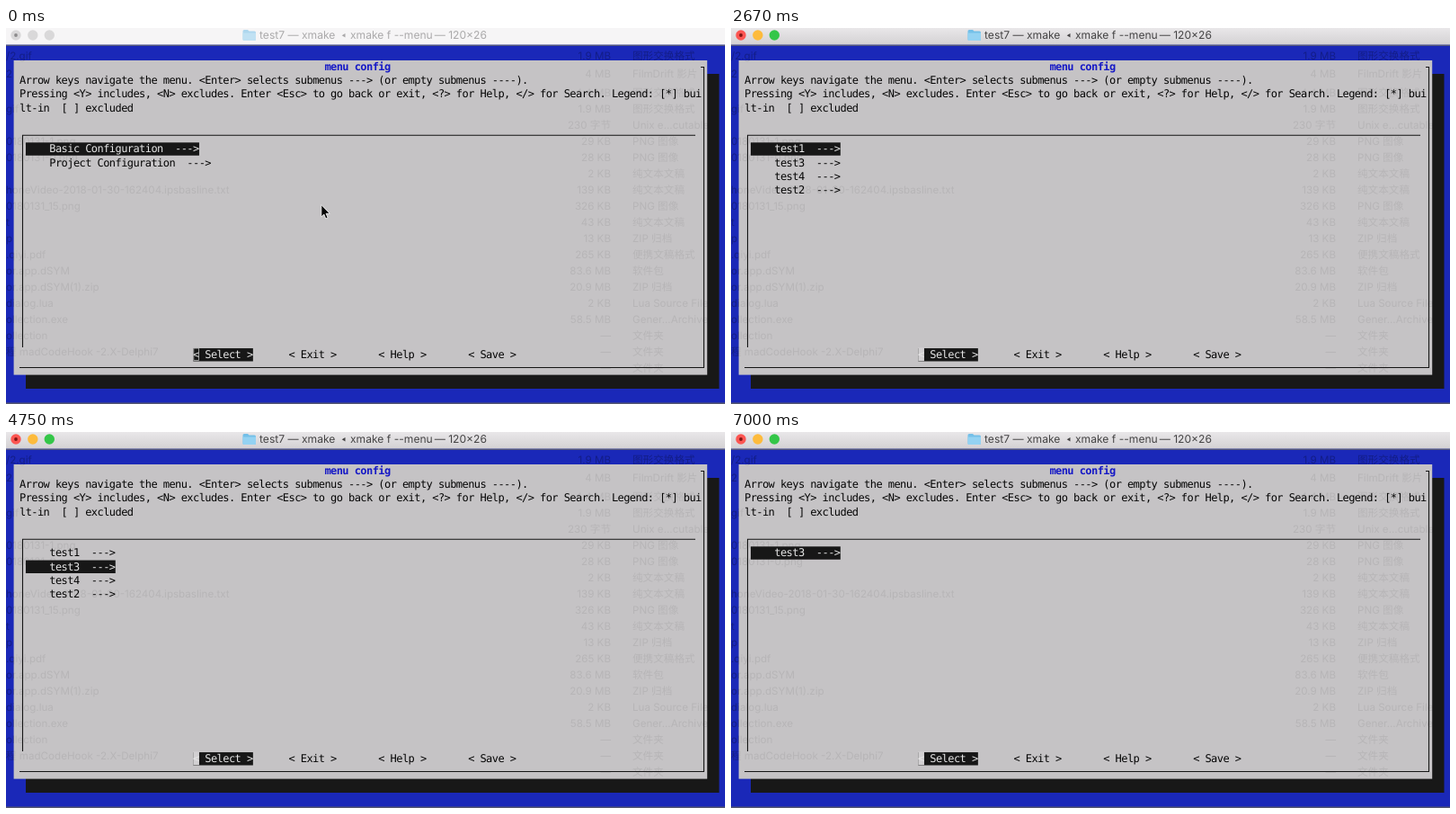
Write an HTML page that moves like this. It is 800x418 px and loops after 7080 ms.

```html
<!DOCTYPE html>
<html lang="en">
<head>
<meta charset="utf-8">
<title>menu config</title>
<style>
  html, body { margin: 0; width: 100%; height: 100%; overflow: hidden; background: #1a28b8; }
  svg { display: block; width: 100%; height: 100%; }
  text { white-space: pre; text-rendering: geometricPrecision; }
  .mono { font: 12px "DejaVu Sans Mono", monospace; letter-spacing: -.569px; fill: #050505; }
  .mono.title { font-weight: bold; fill: #1518c6; }
  .mono.lit { fill: #e6e6e6; }
  .bar { fill: #171717; }
  .ui { font: 12.1px Inter, "Noto Sans CJK SC", "Noto Sans CJK", sans-serif; }
  .ghost { font-size: 11.6px; fill: #000; }
  .rule { fill: none; stroke: #151515; stroke-width: 1.1; }

  .timed { opacity: 0; animation: 7080ms step-end infinite; }
  #idle { animation-name: idle; }
  #focus { animation-name: focus; }
  #arrow { animation-name: arrow; }
  #beam { animation-name: beam; }
  #basic { animation-name: basic; }
  #project { animation-name: project; }
  #first { animation-name: first; }
  #second { animation-name: second; }
  #target { animation-name: inner; }
  @keyframes idle { 0% { opacity: 1 } 17.66%, 100% { opacity: 0 } }
  @keyframes focus { 0% { opacity: 0 } 17.66%, 100% { opacity: 1 } }
  @keyframes arrow { 0% { opacity: 1 } 14.12%, 100% { opacity: 0 } }
  @keyframes beam { 0% { opacity: 0 } 14.12% { opacity: 1 } 22.32%, 100% { opacity: 0 } }
  @keyframes basic { 0% { opacity: 1 } 22.32%, 100% { opacity: 0 } }
  @keyframes project { 0% { opacity: 0 } 22.32% { opacity: 1 } 35.31%, 100% { opacity: 0 } }
  @keyframes first { 0% { opacity: 0 } 35.31% { opacity: 1 } 43.5%, 100% { opacity: 0 } }
  @keyframes second { 0% { opacity: 0 } 43.5% { opacity: 1 } 70.62%, 100% { opacity: 0 } }
  @keyframes inner { 0% { opacity: 0 } 70.62%, 100% { opacity: 1 } }
</style>
</head>
<body>
<svg viewBox="0 0 800 418" preserveAspectRatio="none">
  <defs>
    <linearGradient id="chrome" x2="0" y2="1">
      <stop stop-color="#e9e7e9"/><stop offset="1" stop-color="#d3d1d3"/>
    </linearGradient>
    <g id="folder">
      <path d="M263.5 3.5q0-1.5 1.5-1.5h4l1.5 1.5h6q1.5 0 1.5 1.5v7.5q0 1.5-1.5 1.5h-11.5q-1.5 0-1.5-1.5z" fill="#74c0e8"/>
      <path d="M263.5 5.5h14.5v7q0 1.5-1.5 1.5h-11.5q-1.5 0-1.5-1.5z" fill="#94d2f2"/>
    </g>
    <g id="caption" class="ui">
      <text x="282" y="12.4">test7 — xmake</text>
      <path d="M377.5 6v4.6l-3.8-2.3z"/>
      <text x="383" y="12.4">xmake f --menu</text>
      <text x="535" y="12.4" text-anchor="end">— 120×26</text>
    </g>
    <g id="ghosts"></g>
    <path id="caret" d="M347.8 190.5q3.2 0 3.2 2.2v10.600q0 2.2-3.2 2.2M354.2 190.5q-3.2 0-3.2 2.2M351 203.3q0 2.2 3.2 2.2M349 199.8h4"/>
  </defs>

  <rect width="800" height="418" fill="#1a28b8"/>
  <rect y="416.5" width="800" height="1.5" fill="#55576f"/>
  <use href="#ghosts" opacity=".2"/>
  <rect x="22" y="51" width="771.5" height="350" fill="#181818"/>
  <rect x="8.6" y="36" width="771.6" height="349.6" fill="#c5c3c5"/>
  <use href="#ghosts" opacity=".07"/>

  <g class="rule">
    <path d="M767 119.2H18.5V355"/>
    <path d="M773 43.5H776.5V377.5H15"/>
  </g>
  <g id="labels"></g>
  <g id="menus"></g>

  <g id="idle" class="timed">
    <rect width="800" height="18.7" fill="#f6f5f6"/>
    <rect y="18.7" width="800" height="1.3" fill="#55587a"/>
    <g fill="#d9d8d9">
      <circle cx="11" cy="8" r="5.7"/><circle cx="29.8" cy="8" r="5.7"/><circle cx="48.3" cy="8" r="5.7"/>
    </g>
    <circle cx="11" cy="8" r="1.9" fill="#8c8b8c"/>
    <use href="#folder" opacity=".55"/>
    <use href="#caption" fill="#aaa9aa"/>
    <rect x="208.8" y="356" width="5.7" height="13.5" fill="none" stroke="#b8b8b8" stroke-width=".8"/>
  </g>
  <g id="focus" class="timed">
    <rect width="800" height="18.7" fill="url(#chrome)"/>
    <rect y="18.7" width="800" height="1.3" fill="#55587a"/>
    <circle cx="11" cy="8" r="5.7" fill="#fc5652"/>
    <circle cx="11" cy="8" r="1.9" fill="#7d1512"/>
    <circle cx="29.8" cy="8" r="5.7" fill="#fdbb3c"/>
    <circle cx="48.3" cy="8" r="5.7" fill="#34c648"/>
    <use href="#folder"/>
    <use href="#caption" fill="#444344"/>
    <rect x="208.3" y="355.4" width="6.65" height="14.8" fill="#d2d0d2"/>
    <text class="mono lit" x="208" y="367">&lt;</text>
  </g>

  <path id="arrow" class="timed" d="M350.8 196.5v13.5l3-2.9 2 4.9 2.3-1-2-4.700h4.2z" fill="#080808" stroke="#f4f4f4" stroke-width=".9"/>
  <g id="beam" class="timed" fill="none" stroke-linecap="round">
    <use href="#caret" stroke="#e4e4e4" stroke-width="2"/>
    <use href="#caret" stroke="#111"/>
  </g>
</svg>

<script>
  const CELL = 6.655, LINE = 15.25;
  const colX = c => 2 + c * CELL;
  const rowY = r => 126.9 + (r - 7) * LINE;
  const $ = id => document.getElementById(id);

  function add(parent, tag, attrs, text) {
    const el = document.createElementNS('http://www.w3.org/2000/svg', tag);
    for (const key in attrs) el.setAttribute(key, attrs[key]);
    if (text) el.textContent = text;
    return parent.appendChild(el);
  }

  function put(parent, col, row, text, style = '') {
    if (style === 'lit') {
      add(parent, 'rect', { class: 'bar', x: colX(col), y: rowY(row) + .4, width: text.length * CELL, height: LINE - .8 });
    }
    add(parent, 'text', { class: 'mono ' + style, x: colX(col) - .3, y: rowY(row) + 11.5 }, text);
  }

  // File list showing faintly through the window: y, name, size, kind
  const files = [
    [31, '/2.gif', '1.9 MB', '图形交换格式'],
    [51, '2', '4 MB', 'FilmDrift 影片'],
    [72, '', '4.4 MB', '图形交换格式'],
    [90, 'gif', '1.9 MB', '图形交换格式'],
    [108, '', '230 字节', 'Unix e...cutable'],
    [126, '0180131-1.png', '29 KB', 'PNG 图像'],
    [144, '0180131-0.png', '28 KB', 'PNG 图像'],
    [162, '', '2 KB', '纯文本文稿'],
    [180, 'honeVideo-2018-01-30-162404.ipsbasline.txt', '139 KB', '纯文本文稿'],
    [198, '0180131_15.png', '326 KB', 'PNG 图像'],
    [216, 't', '43 KB', '纯文本文稿'],
    [234, 'p', '13 KB', 'ZIP 归档'],
    [252, '.qiyi.pdf', '265 KB', '便携文稿格式'],
    [270, 'or.app.dSYM', '83.6 MB', '软件包'],
    [288, 'or.app.dSYM(1).zip', '20.9 MB', 'ZIP 归档'],
    [306, 'dialog.lua', '2 KB', 'Lua Source File'],
    [324, 'ollection.exe', '58.5 MB', 'Gener...Archive'],
    [342, 'ollection', '—', '文件夹'],
    [360, '程 madCodeHook -2.X-Delphi7', '—', '文件夹'],
    [378, '', '—', '文件夹']
  ];
  for (const [y, name, size, kind] of files) {
    const cell = (x, text, anchor) =>
      add($('ghosts'), 'text', { class: 'ui ghost', x, y: y + 4.2, 'text-anchor': anchor }, text);
    cell(0, name, 'start');
    cell(673, size, 'end');
    cell(697, kind, 'start');
  }

  const labels = $('labels');
  put(labels, 53, 1, 'menu config', 'title');
  put(labels, 2, 2, 'Arrow keys navigate the menu. <Enter> selects submenus ---> (or empty submenus ----).');
  put(labels, 2, 3, 'Pressing <Y> includes, <N> excludes. Enter <Esc> to go back or exit, <?> for Help, </> for Search. Legend: [*] bui');
  put(labels, 2, 4, 'lt-in  [ ] excluded');
  put(labels, 31, 22, '< Select >', 'lit');
  put(labels, 47, 22, '< Exit >');
  put(labels, 62, 22, '< Help >');
  put(labels, 77, 22, '< Save >');

  function menu(id, items, chosen) {
    const group = add($('menus'), 'g', { id, class: 'timed' });
    items.forEach((item, i) =>
      put(group, 3, 7 + i, `    ${item}  --->`, i === chosen ? 'lit' : ''));
  }
  const sections = ['Basic Configuration', 'Project Configuration'];
  const tests = ['test1', 'test3', 'test4', 'test2'];
  menu('basic', sections, 0);
  menu('project', sections, 1);
  menu('first', tests, 0);
  menu('second', tests, 1);
  menu('target', ['test3'], 0);
</script>
</body>
</html>
```
